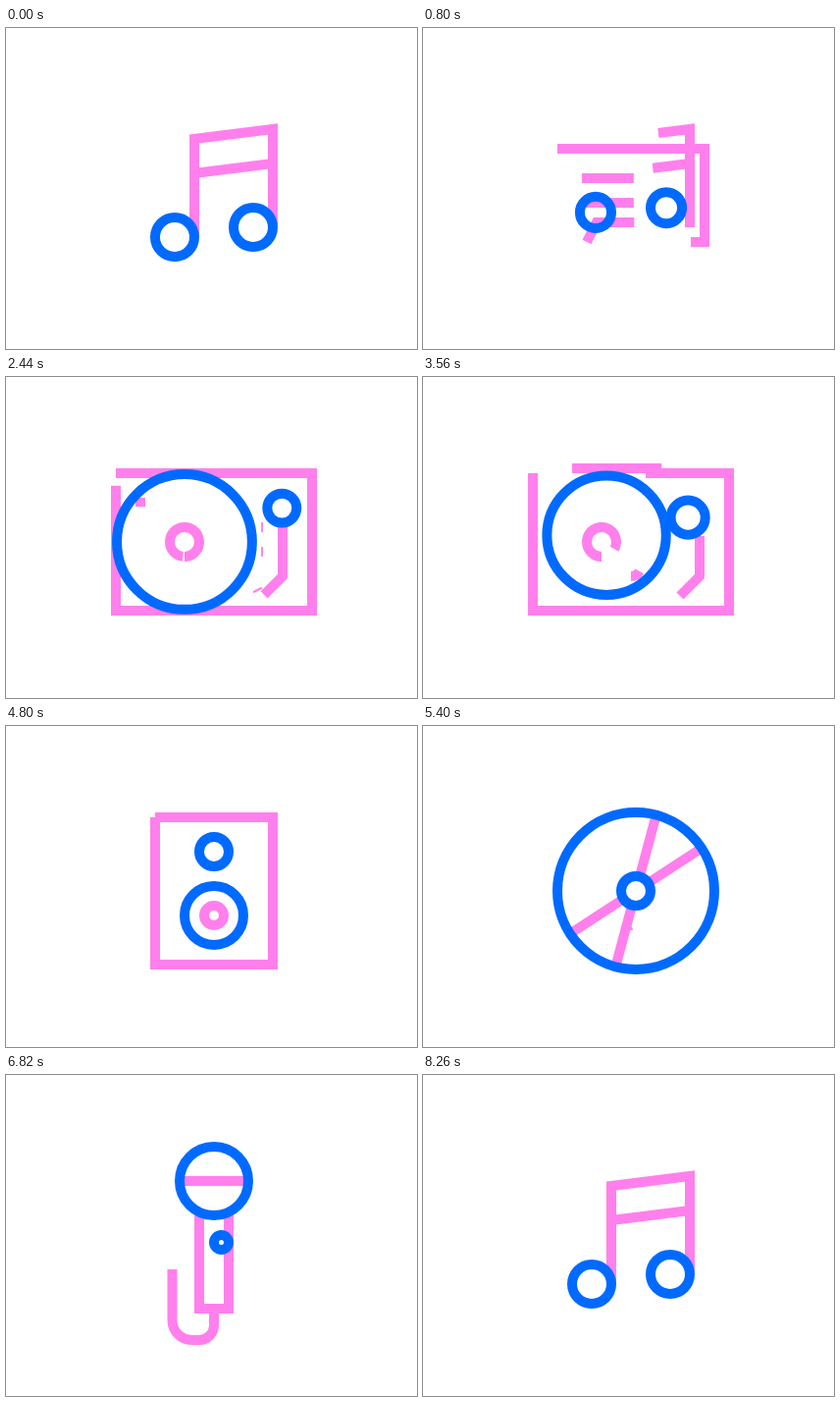
An HTML page for the animation above (8540 ms loop, 419 by 327 pixels).

```html
<!DOCTYPE html>
<html>
<head>
<meta charset="utf-8">
<title>Music icons</title>
<style>
html, body { margin: 0; width: 100%; height: 100%; overflow: hidden; background: #fff; }
svg { display: block; width: 419px; height: 327px; fill: none; stroke-width: 10; }
path { stroke: #ff80ec; }
circle { stroke: #006aff; }
</style>
</head>
<body>
<svg viewBox="0 0 419 327"><g id="lines"></g><circle/><circle/></svg>
<script>
const LOOP = 8540, LEAD = 15, DURATION = 620;

const ring = (x, y, r) => `M${x} ${y + r}a${r} ${r} 0 0 0 0 ${-2 * r}a${r} ${r} 0 0 0 0 ${2 * r}`;

const spoke = degrees => {
  const a = degrees * Math.PI / 180;
  const point = r => `${217 + r * Math.cos(a)} ${168 - r * Math.sin(a)}`;
  return `M${point(15)}L${point(80)}`;
};

// start: when the icon begins to give way to the next; circles: [x, y, radius]
const icons = [
  { start: 500, circles: [[172, 213, 20], [252, 203, 20]],
    lines: ['M192 213V113L272 103V203', 'M192 148L272 138'] },
  { start: 1940, circles: [[179.5, 165.5, 12.5], [244.5, 165.5, 12.5]],
    lines: ['M137 123H287V218H137V123', 'M162 153H262', 'M162 178H262', 'M167 218L177 198H247L257 218'] },
  { start: 3360, circles: [[182, 168, 70], [282, 133, 15]],
    lines: ['M112 98H312V238H112V98', ring(182, 168, 15), 'M282 148V203L262 223'] },
  { start: 4800, circles: [[212, 128, 15], [212, 193, 30]],
    lines: ['M152 93H272V243H152V93', ring(212, 193, 10)] },
  { start: 6220, circles: [[217, 168, 80], [217, 168, 15]],
    lines: [75, 33, 255, 213].map(spoke) },
  { start: 7640, circles: [[212, 108, 35], [219.5, 170.5, 7.5]],
    lines: ['M177 108H247', 'M197 138V238H227V138',
      'M212 238V255A15 15 0 0 1 197 270H189.5A20 20 0 0 1 169.5 250V198'] }
];

const group = document.getElementById('lines');
const circles = document.querySelectorAll('circle');
for (const icon of icons) {
  icon.paths = icon.lines.map(d => {
    const path = document.createElementNS('http://www.w3.org/2000/svg', 'path');
    path.setAttribute('d', d);
    path.setAttribute('pathLength', 1);
    group.append(path);
    return path;
  });
}

const ease = t => t < 0.5 ? 4 * t ** 3 : 1 - 4 * (1 - t) ** 3;

// Show the part of each path between two fractions of its length
function trim(icon, from, to) {
  for (const path of icon.paths) {
    path.style.visibility = to > from ? 'visible' : 'hidden';
    path.style.strokeDasharray = from > 0 || to < 1 ? `0 ${from} ${to - from} 2` : 'none';
  }
}

function draw() {
  const time = performance.now() % LOOP;
  let index = icons.findLastIndex(icon => time >= icon.start - LEAD);
  let p = 0;
  if (index < 0) index = 0;
  else p = ease(Math.min(1, (time - icons[index].start + LEAD) / DURATION));

  const current = icons[index], next = icons[(index + 1) % icons.length];
  for (const icon of icons) {
    if (icon === current) trim(icon, p, 1);
    else trim(icon, 0, icon === next ? p : 0);
  }
  circles.forEach((circle, i) => ['cx', 'cy', 'r'].forEach((name, k) => {
    const a = current.circles[i][k], b = next.circles[i][k];
    circle.setAttribute(name, a + (b - a) * p);
  }));
  requestAnimationFrame(draw);
}
draw();
</script>
</body>
</html>
```
